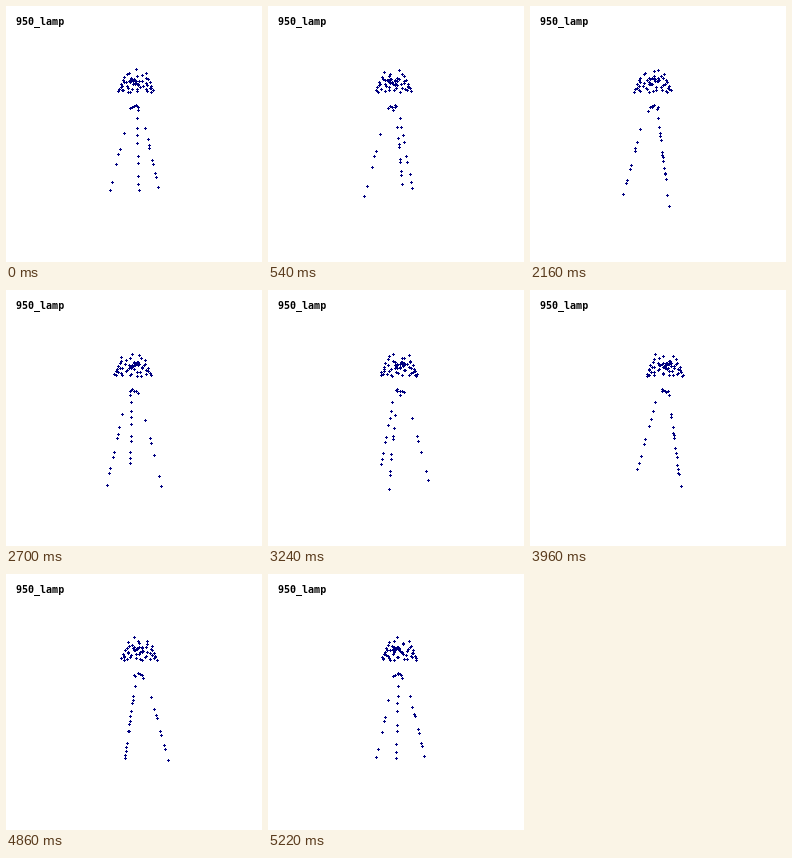
An HTML page with a canvas for the animation above (5.4 s loop, 256 by 256 pixels).

```html
<!DOCTYPE html>
<html lang="en">
<head>
<meta charset="utf-8">
<title>Turning lamp</title>
<style>
  html, body { margin: 0; width: 100%; height: 100%; overflow: hidden; background: #fff; }
  canvas { position: absolute; left: 0; top: 0; width: 256px; height: 256px; }
  p {
    position: absolute; left: 10px; top: 10px; margin: 0; color: #000;
    font: bold 10px/12px "DejaVu Sans Mono", "Liberation Mono", monospace;
  }
</style>
</head>
<body>
<canvas id="stage" width="256" height="256"></canvas>
<p>950_lamp</p>
<script>
const ctx = document.getElementById("stage").getContext("2d");
const STEP = 180, STEPS = 30;
const MID = 128, DIST = 330, TILT = 0.12;
const AXIS = { x: 1.6, z: -6.6 };
const TURN = 2 * Math.PI;
const points = [];

let seed = 950;
function rand() {
  seed = (seed * 1664525 + 1013904223) % 4294967296;
  return seed / 4294967296;
}

const mix = (a, b, t) => a + (b - a) * t;

// Adds a point at an angle and distance from the lamp's axis; y grows downwards
function add(angle, r, y) {
  points.push({ x: AXIS.x + r * Math.sin(angle), y, z: AXIS.z + r * Math.cos(angle) });
}

// Three splayed legs, each dotted from its top to its foot
const legs = [
  { top: -16, foot: 51, dots: 9 },
  { top: -5, foot: 60.5, dots: 9 },
  { top: 0, foot: 63, dots: 6 }
];
legs.forEach(({ top, foot, dots }, i) => {
  const angle = 0.1 + i * TURN / 3;
  for (let k = 0; k < dots; k++) {
    const inner = k > 0 && k < dots - 1;
    const t = (k + (inner ? rand() - 0.5 : 0)) / (dots - 1);
    const y = mix(top, foot, t);
    add(angle, 6.3 + 0.27 * (y + 27), y);
  }
});

// Hub where the legs meet
for (let k = 0; k < 7; k++) {
  add(TURN * k / 7, mix(2, 7, rand()), mix(-29, -23, rand()));
}

// Conical shade, with angles spread by the golden ratio
for (let k = 0; k < 44; k++) {
  const t = Math.sqrt((k + rand()) / 44);
  add(TURN * k * 0.618, mix(8, 18.5, t), mix(-65.5, -41, t));
}

// Bulb inside the shade
for (let k = 0; k < 16; k++) {
  add(TURN * rand(), 7 * Math.sqrt(rand()), mix(-55, -47, rand()));
}

function dot(x, y) {
  ctx.fillRect(x - 1, y, 3, 1);
  ctx.fillRect(x, y - 1, 1, 3);
}

function draw(step) {
  const a = step / STEPS * TURN;
  const c = Math.cos(a), n = Math.sin(a);
  ctx.clearRect(0, 0, 256, 256);
  ctx.fillStyle = "#000080";
  for (const p of points) {
    const x = p.x * c + p.z * n;
    const z = p.z * c - p.x * n;
    const s = DIST / (DIST - z + p.y * TILT);
    dot(Math.round(MID + x * s), Math.round(MID + (p.y + z * TILT) * s));
  }
}

function tick() {
  draw(Math.floor(performance.now() / STEP) % STEPS);
  requestAnimationFrame(tick);
}
tick();
</script>
</body>
</html>
```
